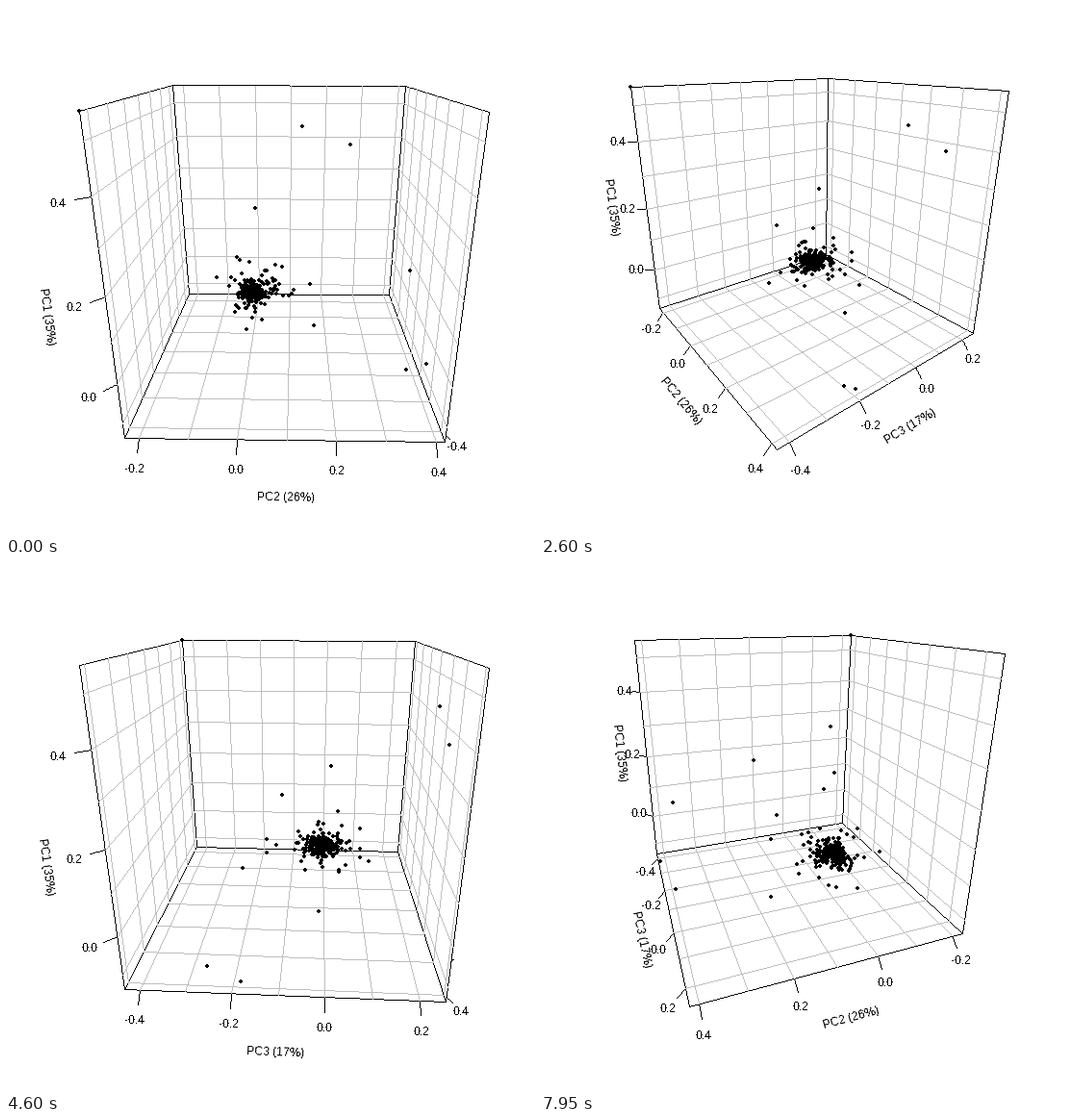
A matplotlib script that plays this animation: 550 by 550 pixels, repeating every 8000 ms.

```python
import itertools
import numpy as np
import matplotlib.pyplot as plt
from matplotlib.animation import FuncAnimation
from matplotlib.collections import PolyCollection

plt.rcParams.update({"font.family": "Liberation Sans",
                     "text.antialiased": False,
                     "text.hinting": "native", "text.hinting_factor": 1})

SIZE, DPI, FRAMES, STEP = 550, 100, 160, 50
FONT = 12 * 72 / DPI
BLACK, GREY = (0, 0, 0, 255), (190, 190, 190, 255)

CENTRE = np.array([289.3, 267.8])    # middle of the plot region
FIT = np.array([426.4, 386.5])       # room for the box
DIST = np.sqrt(3) + 2                # eye distance in half box widths
PHI = np.radians(20)
C, S = np.cos(PHI), np.sin(PHI)

# axis order: PC2 (right), PC3 (depth), PC1 (up)
NAMES = ["PC2 (26%)", "PC3 (17%)", "PC1 (35%)"]
LO = np.array([-0.2296, -0.433, -0.138])
HI = np.array([0.4186, 0.253, 0.549])
CORNERS = np.array(list(itertools.product((-1, 1), repeat=3)), float)


def norm(value, axis):
    return 2 * (value - LO[axis]) / (HI[axis] - LO[axis]) - 1


def steps(axis, step):
    """Multiples of step inside the range of an axis."""
    first, last = int(np.ceil(LO[axis] / step)), int(HI[axis] // step)
    return np.arange(first, last + 1) * step


def cloud():
    """Dense skewed cluster around zero with heavy tails, plus outliers."""
    rng = np.random.default_rng(7)
    offset = rng.normal(0, (0.042, 0.075, 0.04), (320, 3))
    offset *= rng.lognormal(0, 0.62, (320, 1))
    offset[:, 0] *= np.where(offset[:, 0] > 0, 1.7, 1)
    zero = [norm(0, k) for k in range(3)]
    far = [(-1, -1, 1), (.12, 1, .65), (.55, .975, .5), (-.25, .3, .11),
           (.875, -.24, -.18), (1, -.465, -.8), (.91, -.275, -.985)]
    return np.vstack([zero + offset, far]).clip(-1, 1)


def project(pts, theta):
    x, y, z = np.asarray(pts, float).T
    right = x * np.cos(theta) + y * np.sin(theta)
    near = x * np.sin(theta) - y * np.cos(theta)
    w = DIST - C * near - S * z
    return np.column_stack([right / w, (S * near - C * z) / w])


def make_camera(theta):
    """Projection that fits the box into the plot region."""
    flat = project(CORNERS, theta)
    low, high = flat.min(0), flat.max(0)
    scale = (FIT / (high - low)).min()
    return lambda pts: (project(pts, theta) - (low + high) / 2) * scale + CENTRE


def face_quad(axis, side):
    a, b = [k for k in range(3) if k != axis]
    quad = np.full((4, 3), float(side))
    quad[:, a] = (-1, 1, 1, -1)
    quad[:, b] = (-1, -1, 1, 1)
    return quad


def face_grid(axis, side):
    a, b = [k for k in range(3) if k != axis]
    lines = []
    for along, across in ((a, b), (b, a)):
        for v in steps(along, 0.1):
            seg = np.full((2, 3), float(side))
            seg[:, along] = norm(v, along)
            seg[:, across] = (-1, 1)
            lines.append(seg)
    return lines


FACES = {(k, s): (face_quad(k, s), face_grid(k, s))
         for k in range(3) for s in (-1, 1)}
TICKS = [steps(k, 0.2) for k in range(3)]
POINTS = cloud()


def blank():
    return np.zeros((SIZE, SIZE, 4), np.uint8)


def line(img, seg, color):
    """One pixel wide line with hard edges."""
    p, q = np.rint(seg)
    n = int(abs(q - p).max()) + 1
    x, y = np.rint(np.linspace(p, q, n)).astype(int).T
    img[y, x] = color


def dot(img, p):
    """Four pixel disc."""
    x, y = np.rint(p).astype(int)
    img[y - 2:y + 2, x - 1:x + 1] = BLACK
    img[y - 1:y + 1, x - 2:x + 2] = BLACK


# layers from back to front: tick marks, labels, white walls, drawing
fig = plt.figure(figsize=(SIZE / DPI, SIZE / DPI), dpi=DPI, facecolor="white")
ax = fig.add_axes([0, 0, 1, 1])
ax.set(xlim=(0, SIZE), ylim=(SIZE, 0))
ax.axis("off")
under = fig.figimage(blank(), origin="upper", zorder=-1)
over = fig.figimage(blank(), origin="upper", zorder=1)
walls = ax.add_collection(PolyCollection(
    [], facecolors="white", edgecolors="none", zorder=2))


def add_text(s):
    return ax.text(0, 0, s, fontsize=FONT, ha="center", zorder=1,
                   va="center_baseline", rotation_mode="anchor")


titles = [add_text(s) for s in NAMES]
numbers = [[add_text(f"{v:.1f}") for v in vals] for vals in TICKS]


def axis_places(cam):
    """Fixed corner and outward direction of each labelled axis."""
    base = CORNERS[CORNERS[:, 2] < 0]
    flat = cam(base)
    low = base[flat[:, 1].argmax()]
    left = base[flat[:, 0].argmin()]
    return [(low, low * (0, 1, 1)), (low, low * (1, 0, 1)),
            (left, left * (1, 1, 0))]


def draw_axis(img, cam, k, corner, out):
    def at(pos):
        p = corner.copy()
        p[k] = pos
        return p

    for v, label in zip(TICKS[k], numbers[k]):
        p = at(norm(v, k))
        a, b, c = cam([p, p + 0.06 * out, p + 0.12 * out])
        line(img, (a, b), BLACK)
        label.set_position(c)
    mid = at(norm((TICKS[k][0] + TICKS[k][-1]) / 2, k))
    a, b, c = cam([at(-1), at(1), mid + 0.22 * out])
    dx, dy = (b - a) if b[0] > a[0] else (a - b)
    titles[k].set_position(c)
    titles[k].set_rotation(np.degrees(np.arctan2(-dy, dx)))


def draw(i):
    theta = np.radians(i + 1)
    cam = make_camera(theta)
    eye = DIST * np.array([C * np.sin(theta), -C * np.cos(theta), S])
    back, front = blank(), blank()

    for k, (corner, out) in enumerate(axis_places(cam)):
        draw_axis(back, cam, k, corner, out)

    inner = [FACES[k, s] for k, s in FACES if eye[k] * s < 1]
    walls.set_verts([cam(quad) for quad, _ in inner])
    for quad, _ in inner:
        for edge in zip(quad, np.roll(quad, -1, axis=0)):
            line(front, cam(sorted(map(tuple, edge))), BLACK)
    for _, segs in inner:
        for seg in segs:
            line(front, cam(seg), GREY)
    for p in cam(POINTS):
        dot(front, p)

    under.set_data(back)
    over.set_data(front)
    return [under, walls, over]


anim = FuncAnimation(fig, draw, frames=FRAMES, interval=STEP,
                     repeat=True, repeat_delay=0)
plt.show()
```
